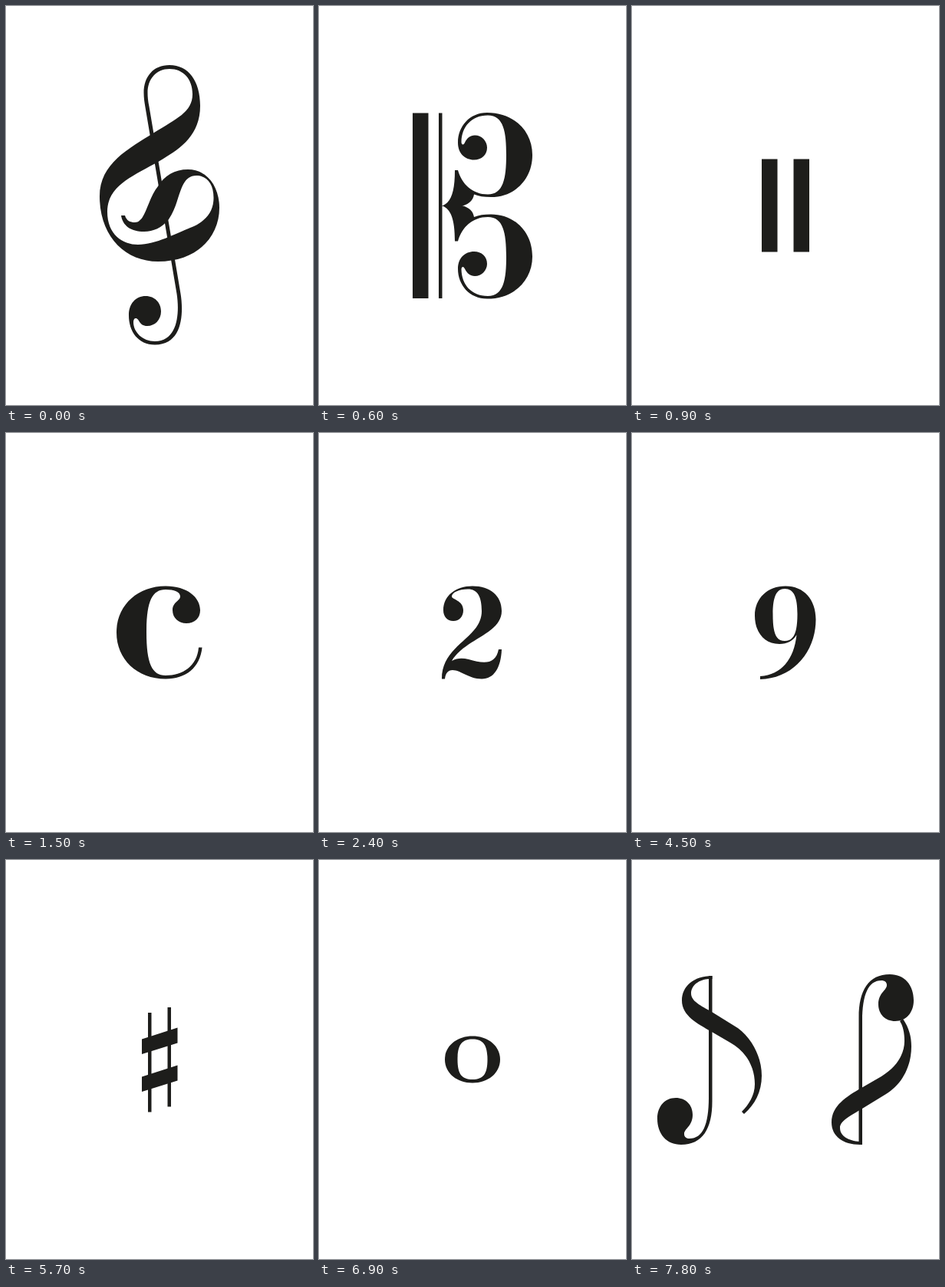
Write an HTML page that moves like this. It is 400 by 520 pixels and loops after 8000 ms.

```html
<!DOCTYPE html>
<html lang="en">
<head>
<meta charset="utf-8">
<title>Music symbols</title>
<style>
html, body { margin: 0; height: 100%; overflow: hidden; background: #fff; }
svg { display: block; width: 100vw; height: 100vh; fill: #1d1d1b; fill-rule: evenodd; }
</style>
</head>
<body>
<svg id="stage" viewBox="0 0 400 520"></svg>
<script>
const STEP = 300, LOOP = 8000;

const path = d => `<path d="${d}"/>`;
const rect = (x, y, w, h) => path(`M${x},${y}h${w}v${h}h${-w}Z`);
const dot = (x, y, r) => `<circle cx="${x}" cy="${y}" r="${r}"/>`;
const move = (s, x, y = 0) => `<g transform="translate(${x},${y})">${s}</g>`;
const turn = s => `<g transform="rotate(180 200 260)">${s}</g>`;
const flip = s => `<g transform="translate(0,520.6) scale(1,-1)">${s}</g>`;
const pair = s => s + turn(s);

// Clefs
const treble =
  path('M213,77C192,77 179.5,92 179.5,113C179.5,120 180.5,126 181.5,132L222.5,375C226,398 225,437 194,437V441.5C232,441.5 231,397 227.5,375L186.5,131C185,124 184.5,118 184.5,113C184.5,95 196,82 213,82Z') +
  path('M213,77C238,77 253,98 253,130C253,168 228,185 205,199C170,220 132,232 132,268C132,298 152,311 172,311C195,311 222,296 240,289C258,282 270.5,270 270.5,250C270.5,232 262,221 248,221C225,221 228,255 212,278C203,289 192,294 180,294C162,294 152,286 150,273H155C157,280 162,282 168,282C182,282 184,252 198,235C206,221 220,213 237,213C262,213 278,235 278,263C278,300 250,333 198,333C155,333 122,300 122,248C122,205 160,186 193,165C222,147 243,138 243,115C243,95 231,82 213,82Z') +
  path('M160,403C160,388 169,378 182,378C194,378 202,387 202,398C202,409 194,417 184,417C173,417 174,407 169,407C167,407 166,409 166,412C166,425 178,437 194,437V441.5C172,441.5 160,424 160,403Z');

const bass =
  path('M109,222C109,188 140,167 178,167C222,167 252,192 252,236C252,300 190,335 118,354L117,350C180,328 214,290 214,232C214,195 206,171 176,171C145,171 122,184 118,200C117,206 121,206 125,202C140,194 158,203 158,219C158,232 148,242 134,242C119,242 109,234 109,222Z') +
  dot(277, 212, 14) + dot(277, 273, 14);

const altoHalf = path('M160,260.7C172,256 177,243 177,214H181C186,232 200,245.5 220,245.5C240,245.5 244,225 244,194C244,165 241,142.5 220,142.5C198,142.5 186,158 185.5,177C185.5,181 188,182 190,178C193,172 197,168.5 203,168.5C212,168.5 219,176 219,184.5C219,194 212,200.5 202,200.5C190,200.5 181,192 181,178C181,157 196,139 219,139C254,139 278,163 278,194C278,226 255,249 224,249C215,249 208,248 202,245.5C201,253 196,258 186,260.7Z');
const alto = rect(122, 139.5, 20.5, 241.5) + rect(156, 139.5, 4.5, 241.5) + altoHalf + flip(altoHalf);

const bars = rect(169, 199.5, 20.5, 121) + rect(210.5, 199.5, 20.5, 121);
const box = path('M170,199.5h60v121h-60ZM174.5,204v112h51v-112Z');

// Time signatures
const common = path('M208,199.5C236,199.5 253,214 253,231C253,241 246,248 235,248C225,248 217,241 217,231C217,220 227,219 227,213C227,207 219,204 208,204C190,204 183,220 183,260C183,300 190,316 208,316C230,316 249,304 251,279.5H255.5C253,306 234,320.5 208,320.5C171,320.5 144,295 144,260C144,225 171,199.5 208,199.5Z');
const cut = common + rect(203, 169, 4.5, 182);

const six = path('M233,199V203C205,205 189,225 185.5,257C190,249 198,245 208,245C228,245 240,261 240,282C240,305 223,320.5 200,320.5C176,320.5 160.5,303 160.5,277C160.5,235 190,200 233,199ZM201,249C189,249 184.5,260 184.5,284C184.5,306 189,317 201,317C212,317 216.5,306 216.5,284C216.5,260 213,249 201,249Z');
const digits = [
  path('M213,199.5V316H231V320.5H171V316H189V212H171V208C185,208 194,205 199,199.5Z'),
  path('M162,231C162,212 178,199.5 200,199.5C223,199.5 238,212 238,232C238,262 190,268 173,297C180,293 187,293 195,295C215,301 230,302 234,282H238C237,306 228,320.5 212,320.5C195,320.5 185,309 174,309C168,309 165,313 164,320.5H160C160,275 212,268 212,232C212,214 207,203.5 194,203.5C182,203.5 173,208 173,213C173,217 188,218 188,231C188,239 183,245 175,245C167,245 162,239 162,231Z'),
  path('M164,226C164,210 179,199.5 200,199.5C222,199.5 236,211 236,228C236,243 226,252 212,256C230,260 240,271 240,287C240,307 223,320.5 199,320.5C176,320.5 160,309 160,294C160,285 166,278 175,278C183,278 188,284 188,291C188,303 175,303 175,309C175,313 184,316.5 194,316.5C209,316.5 215,307 215,287C215,267 208,258 190,258V254C206,254 211,246 211,228C211,211 206,203.5 194,203.5C185,203.5 177,206 177,210C177,215 188,217 188,228C188,235 183,240 176,240C169,240 164,234 164,226Z'),
  path('M220,199.5V284H243V288H220V316H234V320.5H182V316H196V288H157V284L212,199.5ZM196,231L162,284H196Z'),
  path('M168,199.5C190,206 212,206 233,199.5C232,218 215,226 195,226C186,226 178,224 172,221V256C180,247 189,244 201,244C225,244 240,259 240,281C240,305 223,320.5 197,320.5C175,320.5 160,310 160,296C160,287 166,281 174,281C182,281 187,286 187,293C187,303 176,304 176,309C176,313 184,316.5 193,316.5C209,316.5 214,305 214,282C214,260 209,248 196,248C185,248 176,254 172,264H168Z'),
  six,
  path('M162,244V199.5H166C167,205 170,208 176,208C184,208 190,200 203,200C216,200 221,210 230,210C235,210 237,206 238,200H242C242,250 214,260 214,302C214,314 209,320.5 200,320.5C190,320.5 185,313 185,302C185,268 225,258 236,222C228,228 218,228 208,224C190,217 170,215 166,244Z'),
  path('M200,199.5C222,199.5 236,211 236,227C236,239 228,247 216,252C232,258 240,270 240,286C240,307 224,320.5 200,320.5C176,320.5 160,308 160,290C160,276 169,266 182,261C171,254 164,244 164,230C164,212 178,199.5 200,199.5ZM200,203.5C188,203.5 182,210 182,220C182,234 197,241 212,250C219,244 221,236 221,226C221,211 213,203.5 200,203.5ZM185,263C176,270 173,278 173,290C173,307 183,316.5 199,316.5C212,316.5 219,310 219,300C219,282 203,274 185,263Z'),
  turn(six)
];

// Accidentals
const flat = path('M177,163H181.5V243C186,235 194,230 204,230C217,230 223,238 223,249C223,271 197,278 181,299H177ZM181.5,252V289C194,276 203,268 203,249C203,239 200,234 195,234C188,234 183,241 181.5,252Z');
const slant = y => path(`M177,${y}L223.5,${y - 15}v20L177,${y + 19.5}Z`);
const slants = slant(233.5) + slant(282.5);
const natural = rect(177, 183, 4.5, 119) + rect(219, 218, 4.5, 119) + slants;
const sharp = rect(185, 199, 4.5, 129.5) + rect(210.5, 192, 4.5, 129.5) + slants;
const corners = [[170, 230], [211, 230], [170, 271], [211, 271]].map(([x, y]) => rect(x, y, 19, 19)).join('');
const doubleSharp = corners + path('M184,241L187,238L216,279L213,282ZM213,238L216,241L187,282L184,279Z');

// Notes
const body = rect(144, 230, 113, 17) + rect(144, 273.5, 113, 17) + rect(144, 219, 4.5, 82);
const breve = body + rect(252.5, 219, 4.5, 82);
const longa = body + rect(252.5, 219, 4.5, 190);
const whole = path('M200,229.5C220,229.5 236,242 236,260C236,278 220,290.5 200,290.5C180,290.5 164,278 164,260C164,242 180,229.5 200,229.5ZM200,233.5C186,233.5 180.5,241 180.5,260C180.5,279 186,286 200,286C214,286 219.5,279 219.5,260C219.5,241 214,233.5 200,233.5Z');
const half = move(whole, -82, 80.5) + rect(149.5, 151, 4.5, 189);
const note = path('M104.5,151V315C104.5,350 92,371 64,371C45,371 33,357 33,337C33,321 43,310 57,310C70,310 79,319 79,332C79,347 68,350 68,357C68,361 71,363 75,363C92,363 100,345 100,310V151Z');
const eighths = pair(note) +
  path('M104.5,151C80,151 65,165 65,183C65,203 85,213 104,224L128,238C148,249 160,269 160,292C160,307 152,319 143,328L146,331C160,319 169,302 169,281C169,255 154,228 133,216L104,198C90,190 77,184 77,174C77,163 88,155.5 100,155H104.5Z') +
  path('M353,207C361,219 364,230 364,243C364,270 351,293 331,305L300,324C285,333 271,340 271,349C271,360 282,366 297,367H300V371H297C275,371 260,360 260,342C260,320 280,308 299,297L325,282C346,269 355,252 355,236C355,225 353,216 349,210Z');

const symbols = [
  treble, bass, alto, bars, box, common, cut, ...digits,
  move(flat, -24) + move(flat, 24), flat, natural, sharp, doubleSharp,
  longa, breve, whole, pair(half), pair(move(note, 49)), eighths
];

const stage = document.getElementById('stage');
const start = performance.now();
let shown = -1;
function draw(now) {
  const i = Math.floor(Math.max(0, now - start) % LOOP / STEP);
  if (i !== shown) stage.innerHTML = symbols[shown = i];
  requestAnimationFrame(draw);
}
draw(start);
</script>
</body>
</html>
```
